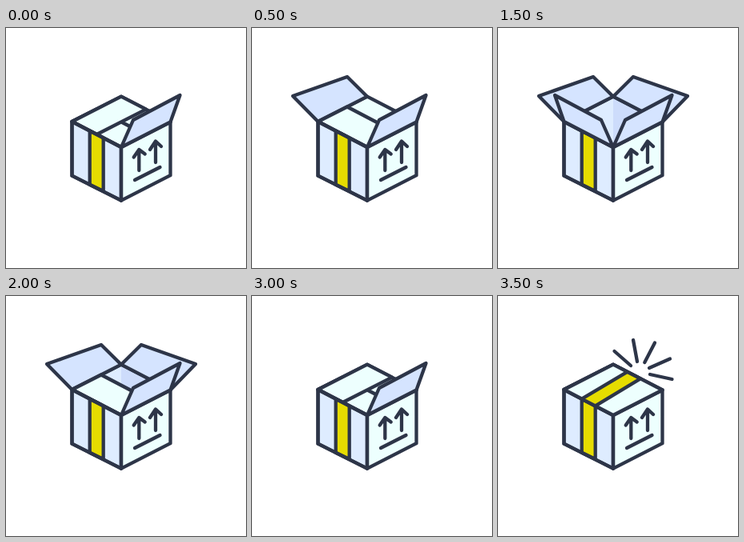
An HTML page that plays this animation: 300x300 px, repeating every 4000 ms.

```html
<!DOCTYPE html>
<html lang="en">
<head>
<meta charset="utf-8">
<title>Box</title>
<style>
  html, body { margin: 0; width: 100%; height: 100%; overflow: hidden; background: #fff; }
  svg { display: block; width: 100vw; height: 100vh; }
  svg * { stroke: #2d3548; stroke-width: 4.3; stroke-linejoin: round; stroke-linecap: round; fill: none; }
  svg .plain { stroke: none; }
  svg .white { fill: #edfffe; }
  svg .pale { fill: #deecff; }
  svg .blue { fill: #d5e4ff; }
  svg .deep { fill: #cddcfb; }
  svg .tape { fill: #e6dc00; }
</style>
</head>
<body>
<svg viewBox="0 0 300 300">
  <!-- inside walls -->
  <path class="plain pale" d="M82.5 117L144 85.7V149Z"/>
  <path class="plain deep" d="M205.5 117.5L144 85.7V149Z"/>
  <path id="backShut" class="plain white" d="M144 85.7L205.5 117.5L169 136L107 104.5Z"/>
  <path d="M82.5 117L144 85.7L205.5 117.5"/>

  <path id="backOpen" class="blue" d="M144 85.7L169 61L237 85L205.5 117.5Z"/>
  <path id="sideOpen" class="blue" d="M82.5 117L51 85L119 61L144 85.7Z"/>
  <path id="frontShut" class="white" d="M82.5 117L119 98.5L181 131L144 149Z"/>
  <g id="sideShut">
    <path class="white" d="M82.5 117L113.5 101.5L175 133.5L144 149Z"/>
    <path class="white" d="M82.5 117L144 85.7L175 101.7L113.5 133Z"/>
  </g>

  <!-- outer walls -->
  <path class="pale" d="M82.5 117L144 149V215.7L82.5 184.7Z"/>
  <path class="white" d="M144 149L205.5 117.5V184.2L144 215.7Z"/>
  <path class="tape" d="M104.7 128.6L121.7 137.4V204L104.7 195.8Z"/>
  <path d="M82.5 117L144 149V215.7L82.5 184.7Z"/>
  <path d="M166.3 178V153M159.7 161.5L166.3 152L173.7 157.5M187 168V142M180 152L187 141.5L194 148M161 190L192.5 174"/>

  <path id="frontOpen" class="blue" d="M82.5 117L71 84L129 115L144 149Z"/>
  <path id="rightOpen" class="blue" d="M144 149L159 115L217.5 84L205.5 117.5Z"/>

  <g id="sealed">
    <path class="white" d="M82.5 117L144 85.7L205.5 117.5L144 149Z"/>
    <path class="tape" d="M104.7 128.6L161.5 94.8L178 103.3L121.7 137.4Z"/>
    <path d="M145.5 69L166 87M169 55L174 82M196 58.5L183.3 83M215 78.5L189 90M217.5 104L190 98"/>
  </g>
</svg>
<script>
  const STEP = 500;
  // number of flaps raised during each step; 0 means taped shut
  const RAISED = [1, 2, 3, 4, 3, 2, 1, 0];

  const show = (id, on) => {
    document.getElementById(id).style.display = on ? "" : "none";
  };

  function draw(time) {
    const n = RAISED[Math.floor(time / STEP) % RAISED.length];
    show("rightOpen", n >= 1);
    show("sideOpen", n >= 2);
    show("sideShut", n < 2);
    show("backOpen", n >= 3);
    show("backShut", n < 3);
    show("frontOpen", n >= 4);
    show("frontShut", n >= 2 && n < 4);
    show("sealed", n === 0);
  }

  const start = performance.now();
  function tick() {
    draw(performance.now() - start);
    requestAnimationFrame(tick);
  }
  tick();
</script>
</body>
</html>
```
